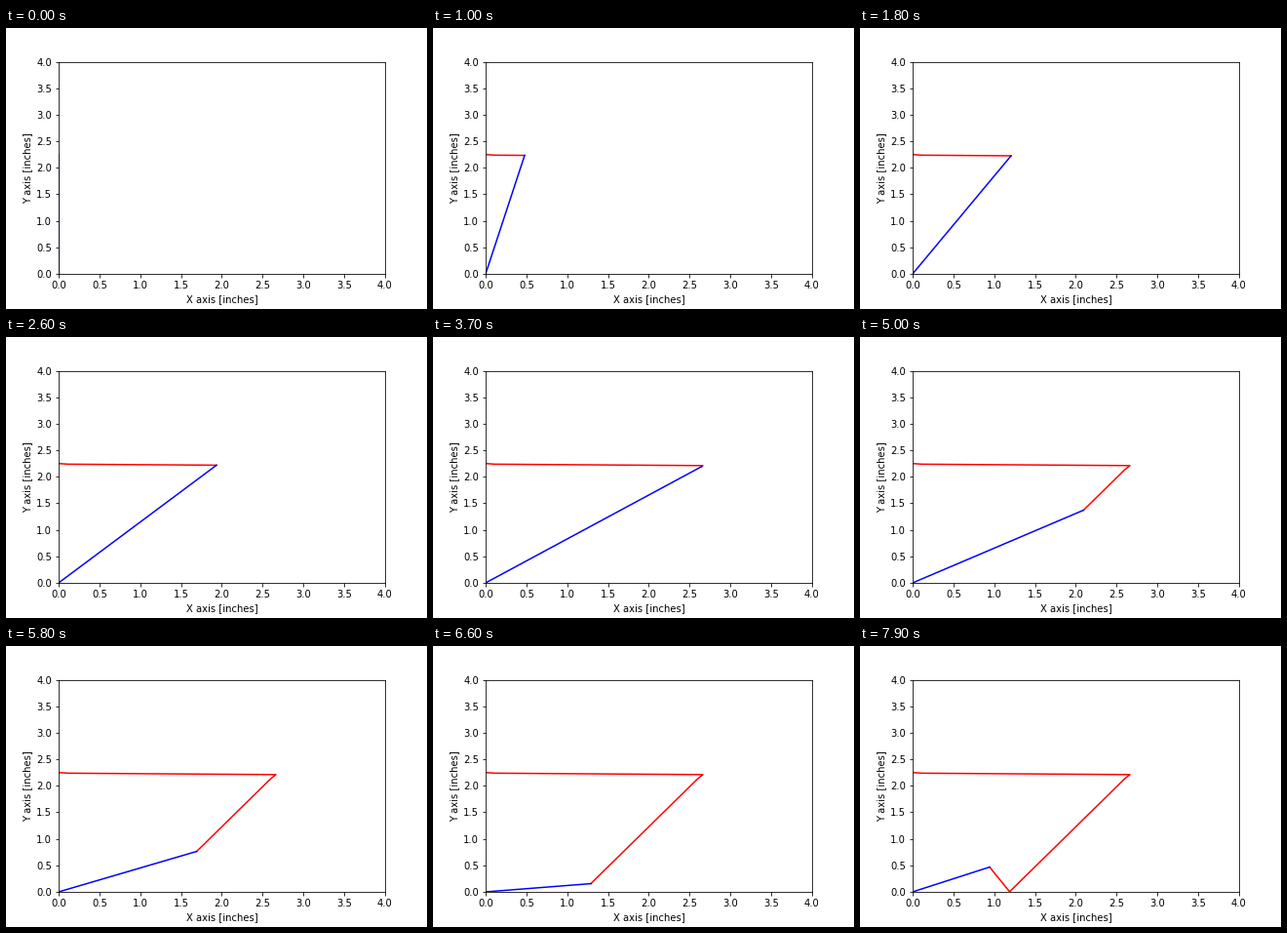
Animation, 432 px wide and 288 px high, one loop 8000 ms. Source, as a matplotlib script:

```python
import matplotlib.pyplot as plt
import numpy as np
from matplotlib.animation import FuncAnimation

FRAMES = 80
STEP_MS = 100
PERIOD = 34       # frames from one stroke to the next
FIRST_STEP = 6    # frame of the first full step
STEPS = 28        # even steps after the first one
NUDGE = 0.2       # part of the first step taken early, before the pause

# Each stroke of the arm tip: start, point after the first step, end (inches)
STROKES = [
    [(0, 2.25), (0.114, 2.238), (2.664, 2.211)],
    [(2.664, 2.211), (2.598, 2.13), (1.189, 0.003)],
    [(1.189, 0.003), (1.148, 0.08), (0.005, 2.25)],
]
NUDGE_FRAMES = (2, 37, 71)


def tip(i):
    """Position of the arm tip at frame i."""
    k = sum(i >= start for start in NUDGE_FRAMES[1:])
    nudge, run = NUDGE_FRAMES[k], FIRST_STEP + k * PERIOD
    u = np.interp(i, [nudge - 1, nudge, run - 1, run, run + STEPS],
                  [0, NUDGE, NUDGE, 1, 2])
    return [np.interp(u, [0, 1, 2], axis) for axis in zip(*STROKES[k])]


xs, ys = np.array([tip(i) for i in range(FRAMES)]).T

plt.rcParams["font.family"] = "DejaVu Sans"
fig, ax = plt.subplots(figsize=(6, 4), dpi=72)
fig.subplots_adjust(left=0.125, right=0.9, bottom=0.125, top=0.88)
ax.set(xlim=(0, 4), ylim=(0, 4), xlabel="X axis [inches]", ylabel="Y axis [inches]")
ticks = np.arange(0, 4.1, 0.5)
ax.set_xticks(ticks)
ax.set_yticks(ticks)

trail, = ax.plot([], [], color="red", lw=1.5)
arm, = ax.plot([], [], color="blue", lw=1.5)


def update(i):
    # The trail appears once the tip has left its starting point
    n = i + 1 if xs[i] > 0 else 0
    trail.set_data(xs[:n], ys[:n])
    arm.set_data([0, xs[i]], [0, ys[i]])
    return trail, arm


anim = FuncAnimation(fig, update, frames=FRAMES, init_func=lambda: update(0),
                     interval=STEP_MS, repeat=True, repeat_delay=0)
plt.show()
```
